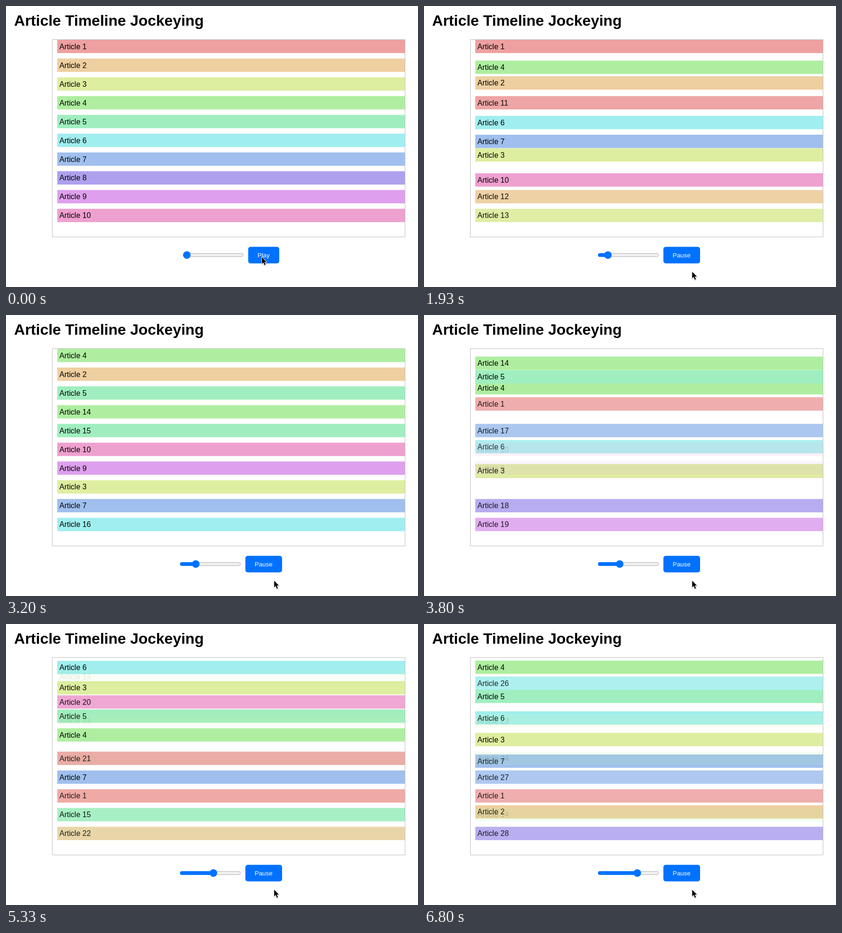
Recreate the animation shown at these times as an HTML page with a canvas. Size 876 px wide and 598 px high, loop 6.87 s.

```html
<!DOCTYPE html>
<html lang="en">
<head>
<meta charset="utf-8">
<title>Article Timeline Jockeying</title>
<style>
  html, body { margin: 0; width: 100%; height: 100%; overflow: hidden; background: #fff; }
  canvas { display: block; width: 876px; height: 598px; }
</style>
</head>
<body>
<canvas id="stage" width="876" height="598"></canvas>
<script>
const ctx = document.getElementById('stage').getContext('2d');

const LOOP = 6870, FRAME = 1000 / 15;
const FIRST_STEP = 1224, STEP = 1004.5, FADE = 1000;
const PLAY_AT = 260;
const BLUE = '#0072ff';
const FONT = '"Liberation Sans", Arial, sans-serif';

// Article ids from top to bottom at each point of the timeline
const orders = [
  [1, 2, 3, 4, 5, 6, 7, 8, 9, 10],
  [1, 4, 2, 11, 6, 7, 3, 10, 12, 13],
  [4, 2, 5, 14, 15, 10, 9, 3, 7, 16],
  [14, 5, 4, 1, 17, 6, 3, 2, 18, 19],
  [6, 3, 20, 5, 4, 21, 7, 1, 15, 22],
  [5, 4, 6, 23, 3, 24, 7, 2, 14, 25],
  [4, 26, 5, 6, 3, 7, 27, 1, 2, 28]
];
const COUNT = 28;

// Hidden articles keep their last slot
const states = [];
orders.forEach((order, s) => {
  const row = [];
  for (let id = 1; id <= COUNT; id++) {
    const slot = order.indexOf(id);
    const before = s ? states[s - 1][id] : { slot: -1 };
    row[id] = slot < 0 ? { slot: before.slot, alpha: 0 } : { slot, alpha: 1 };
  }
  states.push(row);
});

const lerp = (a, b, p) => a + (b - a) * p;
const clamp = v => Math.min(1, Math.max(0, v));

// cubic-bezier(.25, .1, .25, 1)
function ease(u) {
  if (u <= 0) return 0;
  if (u >= 1) return 1;
  const curve = (s, a, b) =>
    3 * a * s * (1 - s) ** 2 + 3 * b * s * s * (1 - s) + s ** 3;
  let lo = 0, hi = 1;
  for (let i = 0; i < 24; i++) {
    const mid = (lo + hi) / 2;
    if (curve(mid, 0.25, 0.25) < u) lo = mid; else hi = mid;
  }
  return curve(lo, 0.1, 1);
}

function text(str, x, y, font, color = '#000', align = 'left') {
  ctx.font = font + ' ' + FONT;
  ctx.fillStyle = color;
  ctx.textAlign = align;
  ctx.fillText(str, x, y);
}

function pill(x, y, w, h, r, fill, stroke) {
  ctx.beginPath();
  ctx.roundRect(x, y, w, h, r);
  ctx.fillStyle = fill;
  ctx.fill();
  if (stroke) {
    ctx.strokeStyle = stroke;
    ctx.lineWidth = 1;
    ctx.stroke();
  }
}

function drawArticle(id, slot, alpha) {
  const y = 71.8 + slot * 39.97;
  ctx.globalAlpha = alpha;
  ctx.fillStyle = `hsl(${(id - 1) % 10 * 36}, 70%, 78%)`;
  ctx.fillRect(109, y, 739, 28.4);
  text('Article ' + id, 113.6, y + 19.9, '16px');
}

function drawList(step, p) {
  ctx.save();
  ctx.beginPath();
  ctx.rect(99, 72, 749, 419);
  ctx.clip();
  const now = states[step], last = states[Math.max(0, step - 1)];
  for (let id = 1; id <= COUNT; id++) {
    const b = now[id], a = last[id];
    const alpha = lerp(a.alpha, b.alpha, p);
    if (b.slot < 0 || alpha < 0.004) continue;
    drawArticle(id, lerp(a.slot < 0 ? b.slot : a.slot, b.slot, p), alpha);
  }
  ctx.restore();
  ctx.strokeStyle = '#bfbfbf';
  ctx.lineWidth = 1;
  ctx.strokeRect(98.5, 71.5, 750, 420);
}

function drawControls(step, playing) {
  const x = playing ? 370.5 : 376.5;
  const thumb = x + 8 + step * 12.5;
  pill(x, 526.5, 128, 7, 3.5, '#efefef', '#b2b2b2');
  if (step) pill(x - 0.5, 526, thumb - x, 8, 4, BLUE);
  pill(thumb - 8, 522, 16, 16, 8, BLUE);
  const half = playing ? 39 : 33;
  pill(548 - half, 512.5, half * 2, 35.3, 5, BLUE);
  text(playing ? 'Pause' : 'Play', 547.7, 534.6, '13.333px', '#fff', 'center');
}

const arrow = new Path2D('M0 0V14.2L3.2 11.2L5.7 17L8 16L5.5 10.3H10Z');
const hand = new Path2D('M5.5 11V3a1.4 1.4 0 0 1 2.8 0V8q1.5-1 2.7.3q1.3-.9 2.5.5' +
  'q2.2-.4 2.3 1.8v2.4q0 2-1.3 5H7L1.8 12q-.6-1.8 1.4-1.8z');

function drawCursor(t) {
  const p = ease(clamp((t - 1000) / 270));
  const x = lerp(544, 570.2, p), y = lerp(534.6, 565.4, p);
  const pointing = t > 60 && y < 548;
  ctx.save();
  ctx.translate(pointing ? x - 2 : x, y);
  ctx.lineJoin = 'round';
  ctx.shadowColor = 'rgba(0, 0, 0, .3)';
  ctx.shadowBlur = 2;
  ctx.shadowOffsetY = 1;
  const shape = pointing ? hand : arrow;
  ctx.lineWidth = pointing ? 1.2 : 2;
  ctx.strokeStyle = pointing ? '#000' : '#fff';
  ctx.stroke(shape);
  ctx.shadowColor = 'transparent';
  ctx.fillStyle = pointing ? '#fff' : '#000';
  ctx.fill(shape);
  ctx.restore();
}

function draw(t) {
  const step = t < FIRST_STEP ? 0
    : Math.min(orders.length - 1, 1 + Math.floor((t - FIRST_STEP) / STEP));
  const p = step ? ease((t - FIRST_STEP - (step - 1) * STEP) / FADE) : 1;
  ctx.fillStyle = '#fff';
  ctx.fillRect(0, 0, 876, 598);
  text('Article Timeline Jockeying', 17.3, 42.2, 'bold 32px');
  drawList(step, p);
  drawControls(step, t >= PLAY_AT);
  drawCursor(t);
}

const start = performance.now();
function tick() {
  const t = Math.max(0, performance.now() - start) % LOOP;
  // The motion runs at 15 pictures a second
  draw(Math.floor((t + 4) / FRAME) * FRAME);
  requestAnimationFrame(tick);
}
tick();
</script>
</body>
</html>
```
